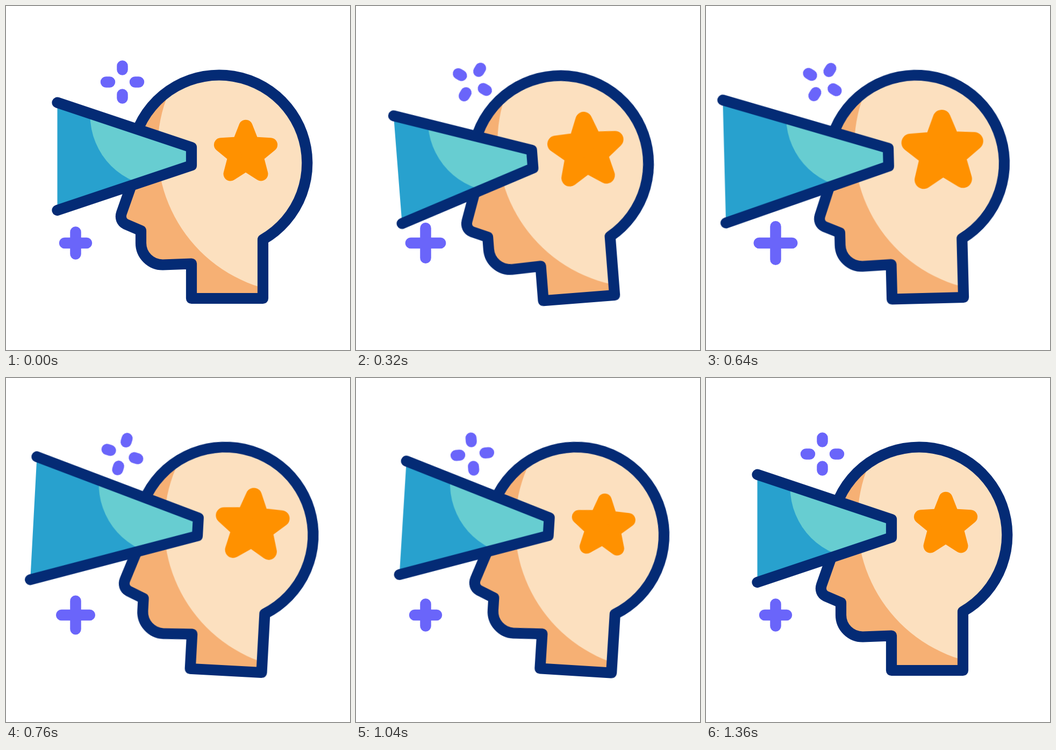
An HTML page that plays this animation: 640 by 640 pixels, repeating every 1.64 s.

```html
<!DOCTYPE html>
<html lang="en">
<head>
<meta charset="utf-8">
<title>Vision</title>
<style>
  html, body { margin: 0; width: 100%; height: 100%; overflow: hidden; background: #fff; }
  svg { display: block; width: 100vw; height: 100vh; }

  .line { fill: none; stroke: #042b75; stroke-width: 20.2; stroke-linecap: round; stroke-linejoin: round; }
  .accent { fill: none; stroke: #6a65fa; stroke-width: 20.5; stroke-linecap: round; }
  .star { fill: #ff9100; stroke: #ff9100; stroke-width: 26; stroke-linejoin: round; }

  .head, .cone, .star, .plus, .spark {
    animation: 1640ms cubic-bezier(.333, 0, .667, 1) infinite;
  }
  .head { animation-name: nod; transform-origin: 402px 500px; }
  .cone { animation-name: extend; }
  .star { animation-name: swell; transform-origin: 446px 273.2px; }
  .plus { animation-name: grow; }
  .spark {
    animation-name: spin;
    animation-timing-function: cubic-bezier(.6, 0, .4, 1);
    transform-origin: 216.5px 141.5px;
  }

  @keyframes nod {
    0%, 2.44% { transform: rotate(0deg); }
    28.05% { transform: rotate(-6deg); }
    53.05% { transform: rotate(5deg); }
    82.01%, 100% { transform: rotate(0deg); }
  }
  @keyframes extend {
    0%, 17.38%, 73.17%, 100% { d: path("M95.5 179.7L345 263L345 296.5L95.5 380"); }
    40.55%, 50.61% { d: path("M39 165.5L345 263L345 296.5L39 394.5"); }
  }
  @keyframes swell {
    0%, 2.44%, 59.45%, 100% { transform: scale(1); }
    32.74% { transform: scale(1.335); }
  }
  @keyframes grow {
    0%, 2.44%, 59.45%, 100% { d: path("M109 441L150 441M129.5 420.5L129.5 461.5"); }
    32.74% { d: path("M97 441L162 441M129.5 408.5L129.5 473.5"); }
  }
  @keyframes spin {
    0%, 1.83% { transform: rotate(0deg); }
    71.34%, 100% { transform: rotate(360deg); }
  }
</style>
</head>
<body>
<svg viewBox="0 0 640 640">
  <defs>
    <path id="skull" d="M345 544H478V434.4A163.8 163.8 0 1 0 232.7 292.3L234 331L215 385C212 394 215 402 223 406L251 418V441A40.5 40.5 0 0 0 291.5 481.5L345 479.5Z"/>
    <clipPath id="inSkull"><use href="#skull"/></clipPath>
    <clipPath id="inCone"><path d="M95.5 179.7L345 263V296.5L95.5 380Z"/></clipPath>
  </defs>

  <g class="head">
    <use href="#skull" fill="#f6b074"/>
    <g clip-path="url(#inSkull)"><circle cx="552" cy="265" r="270" fill="#fce0bf"/></g>
    <use href="#skull" class="line"/>
    <path class="star" d=""/>
    <path class="cone" fill="#28a1ce" d="M95.5 179.7L345 263L345 296.5L95.5 380"/>
    <g clip-path="url(#inCone)"><circle cx="290" cy="203" r="133.5" fill="#67cdd1"/></g>
    <path class="cone line" d="M95.5 179.7L345 263L345 296.5L95.5 380"/>
  </g>

  <path class="plus accent" d="M109 441L150 441M129.5 420.5L129.5 461.5"/>
  <path class="spark accent" d="M216.5 111.5v7M216.5 164.5v7M186 141.5h7M240 141.5h7"/>
</svg>
<script>
  // Five-pointed star: outer and inner corners alternate every 36 degrees.
  const corners = Array.from({ length: 10 }, (_, i) => {
    const r = i % 2 ? 21 : 48.5;
    const a = (i * 36 - 90) * Math.PI / 180;
    return `${446 + r * Math.cos(a)} ${273.2 + r * Math.sin(a)}`;
  });
  document.querySelector('.star').setAttribute('d', `M${corners.join('L')}Z`);
</script>
</body>
</html>
```
